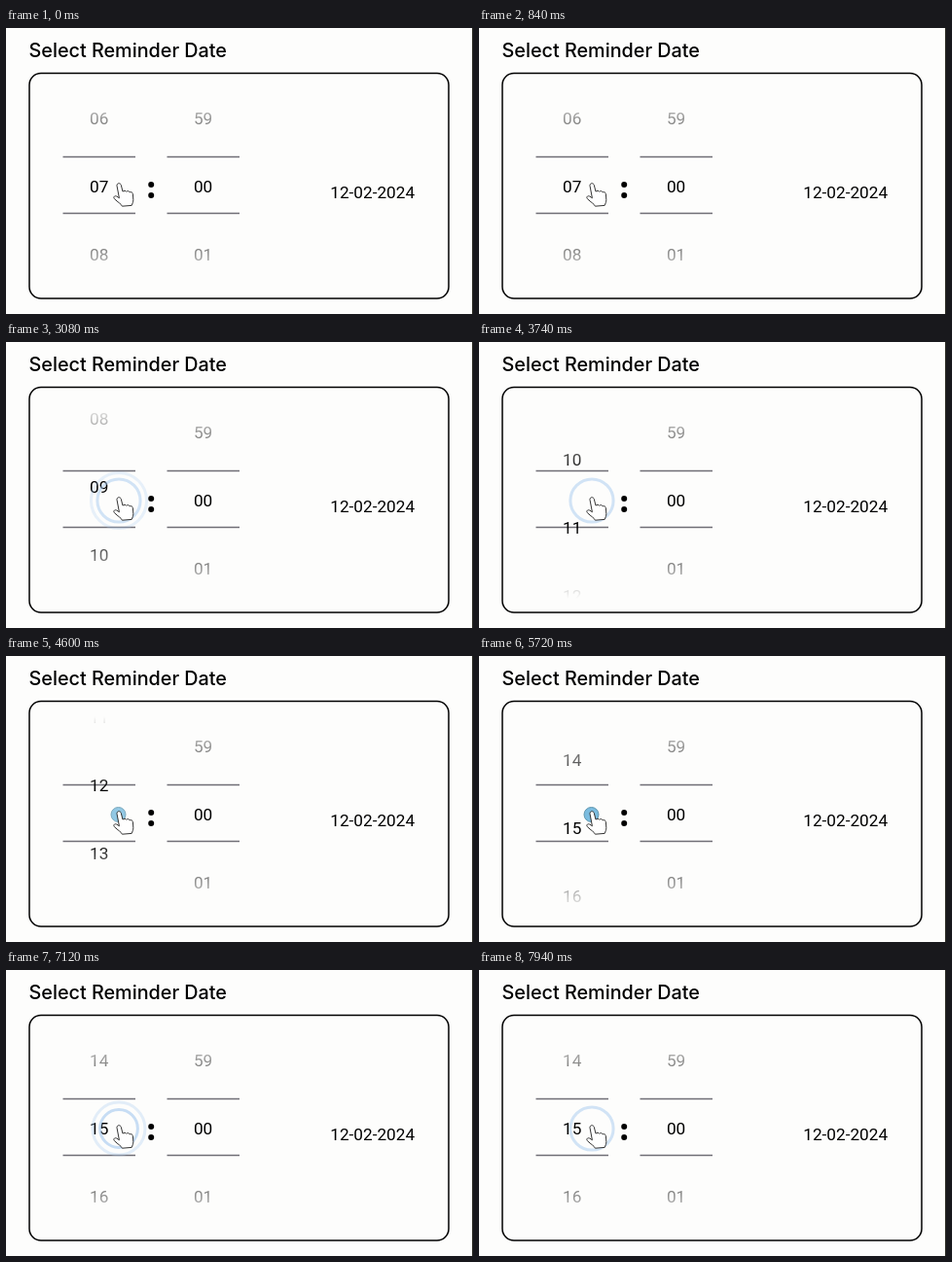
Animation, 480 px wide and 294 px high, one loop 8000 ms. Source, as an HTML page:

```html
<!DOCTYPE html>
<html lang="en">
<head>
<meta charset="utf-8">
<title>Reminder time picker</title>
<style>
  html, body { margin: 0; width: 100%; height: 100%; overflow: hidden; background: #fdfdfc; }
  svg { display: block; width: 100vw; height: 100vh; }
  text { fill: #000; }
  .title { font: 450 19.8px Inter, sans-serif; }
  .num { font: 400 17.2px Roboto, sans-serif; text-anchor: middle; }
</style>
</head>
<body>
<svg viewBox="0 0 480 294">
  <defs>
    <linearGradient id="fade" gradientUnits="userSpaceOnUse" x1="0" y1="62" x2="0" y2="264">
      <stop offset="0" stop-color="#000"/>
      <stop offset=".376" stop-color="#fff"/>
      <stop offset=".624" stop-color="#fff"/>
      <stop offset="1" stop-color="#000"/>
    </linearGradient>
    <mask id="wheel" maskUnits="userSpaceOnUse" x="50" y="62" width="200" height="202">
      <rect x="50" y="62" width="200" height="202" fill="url(#fade)"/>
    </mask>
  </defs>
  <rect width="480" height="294" fill="#fdfdfc"/>
  <path d="M479.5 0V294" stroke="#33332b"/>
  <text class="title" x="23.5" y="29.8">Select Reminder Date</text>
  <rect x="24" y="46.5" width="431" height="231.5" rx="12" fill="none" stroke="#000" stroke-width="1.5"/>
  <path d="M58.5 132.5H133M58.5 190.5H133M165.5 132.5H240M165.5 190.5H240" stroke="#6f6e76" stroke-width="1.7"/>
  <g class="num" mask="url(#wheel)">
    <g id="hours"></g>
    <g id="minutes"></g>
  </g>
  <circle cx="149.2" cy="161" r="3"/>
  <circle cx="149.2" cy="172" r="3"/>
  <text class="num" x="376.7" y="175.4">12-02-2024</text>
  <g id="taps"></g>
  <path d="M114 162.2C113.6 159.3 117.6 158.7 118.3 161.5L120 168.2C121 166.8 123.1 167 123.7 168.3
    C124.8 167.1 126.7 167.5 127.2 168.9C128.6 168.2 130.1 169 130.4 170.6L130.8 176.4
    C130.9 179 129.8 180.6 129.2 182.4L119.4 183.2C118.3 180.6 115 179.2 111.4 175.6
    C109.6 173.4 112.4 172 114 173.2L116.4 174.8Z"
    fill="#fff" stroke="#333" stroke-linejoin="round"/>
</svg>
<script>
const LOOP = 8000, ROW = 70, MID = 163;
const NS = 'http://www.w3.org/2000/svg';
const byId = id => document.getElementById(id);

// Time in ms and the hour under the selector
const scroll = [[0, 7], [900, 7], [1920, 8.13], [3080, 9.2], [3740, 10.6], [5720, 14.8]];
const settle = { from: 5720, length: 900, start: 14.8, end: 15 };

const tapTimes = [1340, 1904, 2300, 2700, 2820, 3480, 4000, 4560, 5120, 5660, 6200, 6770, 6910, 7300, 7680];
const TAP = 500;

function add(parent, name, attrs) {
  const el = document.createElementNS(NS, name);
  for (const key in attrs) el.setAttribute(key, attrs[key]);
  return parent.appendChild(el);
}

function addRows(parent, x, count) {
  return Array.from({ length: count }, () => add(parent, 'text', { x }));
}

function showRows(rows, value, size) {
  const first = Math.round(value) - (rows.length >> 1);
  rows.forEach((row, i) => {
    const n = first + i;
    row.textContent = String((n + size) % size).padStart(2, '0');
    row.setAttribute('y', MID + 6.1 + (n - value) * ROW);
  });
}

function hourAt(t) {
  if (t >= settle.from) {
    const u = Math.min(1, (t - settle.from) / settle.length);
    return settle.end - (settle.end - settle.start) * (1 - u) ** 3;
  }
  const i = scroll.findIndex(point => point[0] > t);
  const [t0, v0] = scroll[i - 1], [t1, v1] = scroll[i];
  return v0 + (v1 - v0) * (t - t0) / (t1 - t0);
}

const hours = addRows(byId('hours'), 95.7, 5);
showRows(addRows(byId('minutes'), 202.6, 3), 0, 60);

const taps = tapTimes.map(start => ({
  start,
  ring: add(byId('taps'), 'circle', { cx: 116, cy: MID, fill: 'none', stroke: '#a9cbef', 'stroke-width': 3 }),
  disc: add(byId('taps'), 'circle', { cx: 115.5, cy: MID, r: 7.5, fill: '#6db6dc', stroke: '#4d8aa5' })
}));

function drawTap({ start, ring, disc }, t) {
  const age = t - start;
  const live = age >= 0 && age < TAP;
  const u = live ? age / TAP : 0;
  const discAlpha = live ? Math.max(0, Math.min(age / 50, 1, (120 - age) / 50)) : 0;
  const ringAlpha = Math.max(0, Math.min(1, (age - 70) / 50)) * 1.1 * (1 - u);
  disc.setAttribute('opacity', discAlpha * .9);
  ring.setAttribute('opacity', live ? ringAlpha : 0);
  ring.setAttribute('r', 8 + 27 * u);
}

function draw(t) {
  showRows(hours, hourAt(t), 24);
  taps.forEach(tap => drawTap(tap, t));
}

const began = performance.now();
function tick() {
  draw((performance.now() - began) % LOOP);
  requestAnimationFrame(tick);
}
draw(0);
tick();
</script>
</body>
</html>
```
